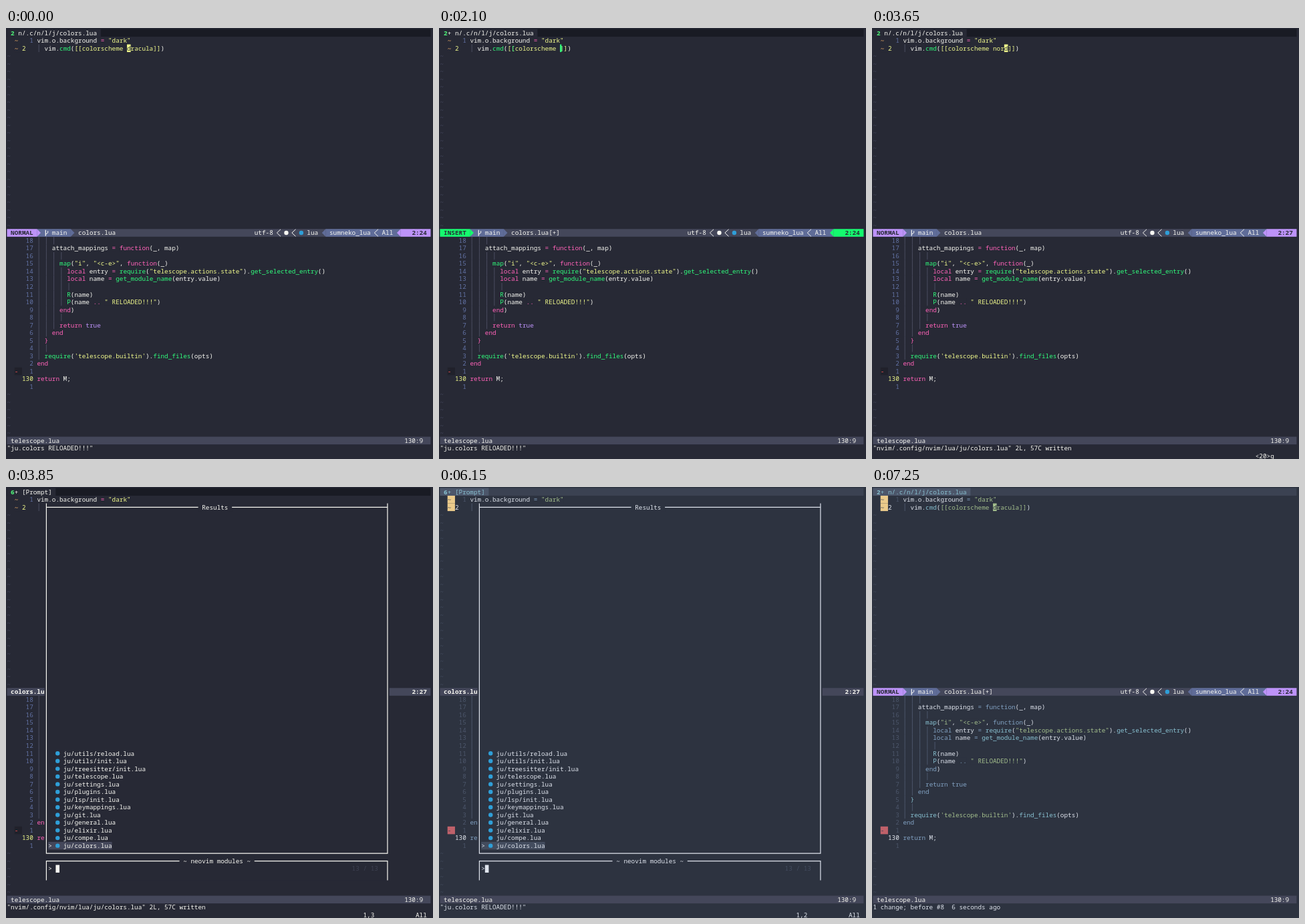
Write an HTML page with a canvas that moves like this. It is 639x646 px and loops after 8000 ms.

```html
<!DOCTYPE html>
<html lang="en">
<head>
<meta charset="utf-8">
<title>Editor session</title>
<style>
  html, body { margin: 0; width: 100%; height: 100%; overflow: hidden; background: #272935; }
  canvas { display: block; }
</style>
</head>
<body>
<canvas id="stage" width="639" height="646"></canvas>
<script>
const ctx = document.getElementById('stage').getContext('2d');
const LOOP = 8000, CW = 5.61, RH = 11.53, PAD = 1.5, COLS = 113;

const THEMES = {
  dracula: {
    bg: '#272935', fg: '#f8f8f2', key: '#ff62b8', func: '#30fa7b', str: '#f1fa8c', constant: '#bd93f9',
    brace: '#ff62b8', number: '#6272a4', current: '#f1fa8c', dim: '#44475a', guide: '#4a4d60',
    tabFill: '#191b24', tabBg: '#272935', tabFg: '#f8f8f2', tabNumber: '#50fa7b',
    change: '#ffb86c', changeBg: '#272935', remove: '#ff5555', removeBg: '#20212b', counter: '#3d4051'
  },
  nord: {
    bg: '#2d3340', fg: '#dfe4ed', key: '#81a1c1', func: '#88c0d0', str: '#a3be8c', constant: '#81a1c1',
    brace: '#88c0d0', number: '#4c566a', current: '#e5e9f0', dim: '#434c5e', guide: '#4c566a',
    tabFill: '#3b4252', tabBg: '#4c566a', tabFg: '#88c0d0', tabNumber: '#88c0d0',
    change: '#3b4252', changeBg: '#ebcb8b', remove: '#3b4252', removeBg: '#bf616a', counter: '#434c5e'
  }
};
const BAR = '#44475a', BRANCH = '#5f6c98', ICON = '#2f9fd8', POPUP = '#20212b';
const MODES = { NORMAL: '#bd93f9', INSERT: '#14fa6e' };

const RELOADED = '"ju.colors RELOADED!!!"';
const START = {
  theme: 'dracula', word: 'dracula', col: 24, mode: 'NORMAL', modified: false,
  message: RELOADED, keys: '', popup: false, picker: false, listed: false, promptCol: 3
};
const STEPS = [
  [1400, { keys: 'c' }],
  [1650, { keys: 'ci' }],
  [2000, { keys: '', mode: 'INSERT', word: '', modified: true }],
  [2200, { word: 'n', col: 25 }],
  [2350, { word: 'no', col: 26 }],
  [2400, { popup: true }],
  [2500, { word: 'nor', col: 27 }],
  [2600, { word: 'nord', col: 28 }],
  [2650, { mode: 'NORMAL', col: 27, popup: false }],
  [2900, { keys: '<20>' }],
  [3000, { keys: '', modified: false, message: '"nvim/.config/nvim/lua/ju/colors.lua" 2L, 57C written' }],
  [3200, { keys: '<20>' }],
  [3650, { keys: '<20>q' }],
  [3800, { keys: '', picker: true }],
  [3850, { listed: true }],
  [5150, { theme: 'nord', message: RELOADED }],
  [6150, { promptCol: 2 }],
  [6250, { picker: false }],
  [7250, { word: 'dracula', col: 24, modified: true, message: '1 change; before #8  6 seconds ago' }]
];

const CODE = [
  '      ',
  '    attach_mappings = function(_, map)',
  '        ',
  '      map("i", "<c-e>", function(_)',
  '        local entry = require("telescope.actions.state").get_selected_entry()',
  '        local name = get_module_name(entry.value)',
  '          ',
  '        R(name)',
  '        P(name .. " RELOADED!!!")',
  '      end)',
  '        ',
  '      return true',
  '    end',
  '  }',
  '    ',
  "  require('telescope.builtin').find_files(opts)",
  'end',
  '',
  'return M;',
  ''
];
const WORDS = ['normalize', 'normalized', 'normal', 'noremap', 'norcalli', 'nord',
  'node_start', 'node_incremental', 'node_decremental', 'no_errors'];
const MODULES = ['utils/reload', 'utils/init', 'treesitter/init', 'telescope', 'settings', 'plugins',
  'lsp/init', 'keymappings', 'git', 'general', 'elixir', 'compe', 'colors'];
const TOKENS = /(?<str>"[^"]*"|'[^']*'|\[\[.*?\]\])|(?<key>\b(?:function|local|return|end)\b|=|\.\.)|(?<constant>\btrue\b)|(?<func>\w+(?=\())|(?<brace>\})/g;

let theme;
const X = col => PAD + col * CW;
const Y = row => PAD + row * RH;

function text(col, row, string, color = theme.fg, weight = 500) {
  ctx.font = `${weight} 9.35px "Noto Sans Mono", "DejaVu Sans Mono", monospace`;
  ctx.fillStyle = color;
  ctx.fillText(string, X(col), Y(row) + 9);
}

function cells(col, row, width, color, height = 1) {
  ctx.fillStyle = color;
  ctx.fillRect(X(col), Y(row), width * CW, height * RH);
}

function dot(col, row, color) {
  ctx.fillStyle = color;
  ctx.beginPath();
  ctx.arc(X(col + .5), Y(row + .5), 3.2, 0, 7);
  ctx.fill();
}

function line(color, width, ...points) {
  ctx.strokeStyle = color;
  ctx.lineWidth = width;
  ctx.beginPath();
  points.forEach(([col, row]) => ctx.lineTo(X(col), Y(row)));
  ctx.stroke();
}

// Solid separator; dir is 1 for right-pointing, -1 for left-pointing.
function arrow(col, row, dir, color) {
  const base = dir > 0 ? col : col + 1;
  ctx.fillStyle = color;
  ctx.beginPath();
  ctx.moveTo(X(base), Y(row));
  ctx.lineTo(X(base + dir), Y(row + .5));
  ctx.lineTo(X(base), Y(row + 1));
  ctx.fill();
}

function code(row, source) {
  const indent = source.search(/\S|$/);
  for (let i = 0; i < indent; i += 2) line(theme.guide, 1, [8.5 + i, row], [8.5 + i, row + 1]);
  text(8, row, source);
  for (const match of source.matchAll(TOKENS)) {
    const kind = Object.keys(match.groups).find(name => match.groups[name]);
    cells(8 + match.index, row, match[0].length, theme.bg);
    text(8 + match.index, row, match[0], theme[kind]);
  }
}

function sign(row, mark, kind) {
  cells(2, row, 2, theme[kind + 'Bg']);
  text(2, row, mark, theme[kind]);
}

function tabLine(state) {
  const plus = state.picker ? '+' : state.modified ? '+' : '';
  const number = (state.picker ? '6' : '2') + plus;
  const name = state.picker ? '[Prompt]' : 'n/.c/n/l/j/colors.lua';
  cells(0, 0, COLS, theme.tabFill);
  cells(0, 0, number.length + name.length + 3, theme.tabBg);
  text(1, 0, number[0], theme.tabNumber, 700);
  text(2, 0, plus, theme.tabFg);
  text(2 + number.length, 0, name, theme.tabFg);
}

function buffers(state) {
  sign(1, '~', 'change');
  sign(2, '~', 'change');
  text(6, 1, '1', theme.number);
  text(4, 2, '2', theme.current);
  code(1, 'vim.o.background = "dark"');
  code(2, `  vim.cmd([[colorscheme ${state.word}]])`);
  for (let row = 3; row < 26; row++) text(0, row, '~', theme.dim);

  CODE.forEach((source, i) => {
    const row = 27 + i, current = row === 45;
    const number = current ? '130' : String(Math.abs(45 - row)).padStart(3);
    text(4, row, number, current ? theme.current : theme.number);
    code(row, source);
  });
  sign(44, '-', 'remove');
  for (let row = 47; row < 53; row++) text(0, row, '~', theme.dim);
}

function cursor(state) {
  const col = 8 + state.col;
  if (state.mode === 'NORMAL') {
    cells(col, 2, 1, theme.str);
    text(col, 2, state.word[state.col - 24], theme.bg);
    return;
  }
  const color = state.word ? theme.str : theme.func;
  if (!state.word) {
    text(19, 2, '[', color);
    text(col, 2, ']', color);
  }
  cells(col, 2, .4, color);
}

function statusLine(state) {
  const row = 26, position = '2:' + state.col;
  cells(0, row, COLS, BAR);
  if (state.picker) {
    text(1, row, 'colors.lua', '#f8f8f2', 600);
    text(108, row, position, '#f8f8f2', 600);
    return;
  }
  const accent = MODES[state.mode], ink = '#282a36', white = '#f8f8f2';
  cells(8, row, 9, BRANCH);
  cells(0, row, 8, accent);
  arrow(8, row, 1, accent);
  arrow(17, row, 1, BRANCH);
  text(1, row, state.mode, ink, 700);
  line(white, 1.2, [10.3, row + .12], [10.3, row + .9]);
  line(white, 1, [10.3, row + .7], [10.9, row + .5], [10.9, row + .25]);
  text(12, row, 'main', white);
  text(19, row, 'colors.lua' + (state.modified ? '[+]' : ''), white);

  text(66, row, 'utf-8', white);
  dot(74, row, white);
  dot(78, row, ICON);
  text(80, row, 'lua', white);
  arrow(84, row, -1, BRANCH);
  cells(85, row, 20, BRANCH);
  text(86, row, 'sumneko_lua', white);
  text(100, row, 'All', white);
  for (const col of [72, 76, 98]) line(white, 1, [col + 1, row + .04], [col, row + .5], [col + 1, row + .96]);
  arrow(104, row, -1, accent);
  cells(105, row, 8, accent);
  text(108, row, position, ink, 700);
}

function bottomLines(state) {
  cells(0, 53, COLS, BAR);
  text(1, 53, 'telescope.lua', '#f8f8f2');
  text(106, 53, '130:9', '#f8f8f2');
  text(0, 54, state.message);
  text(102, 55, state.keys);
  if (state.picker) {
    text(95, 55, '1,' + state.promptCol);
    text(109, 55, 'All');
  }
}

function popup() {
  cells(31, 3, 31, POPUP, 10);
  cells(61, 3, 1, BAR, 9);
  WORDS.forEach((word, i) => {
    text(32, 3 + i, word);
    text(49, 3 + i, 'Text [LSP]');
  });
}

function title(col, row, label) {
  cells(col - 1, row, label.length + 2, theme.bg);
  text(col, row, label);
}

function picker(state) {
  const left = 10.5, right = 101.5;
  cells(10, 2, 92, theme.bg, 49);
  line(theme.fg, 1.2, [left, 2], [left, 47.5], [right, 47.5], [right, 2]);
  line(theme.fg, 1.2, [left, 2.5], [right, 2.5]);
  line(theme.fg, 1.2, [left, 51], [left, 48.5], [right, 48.5], [right, 51]);
  title(52, 2, 'Results');
  title(47, 48, '~ neovim modules ~');
  text(11, 49, '>');
  cells(10 + state.promptCol, 49, 1, theme.fg);
  if (!state.listed) return;

  cells(11, 46, 17, theme === THEMES.nord ? '#434c5e' : BAR);
  text(11, 46, '>');
  MODULES.forEach((name, i) => {
    dot(13, 34 + i, ICON);
    text(15, 34 + i, `ju/${name}.lua`);
  });
  text(92, 49, '13 / 13', theme.counter);
}

function draw(time) {
  const passed = STEPS.filter(([at]) => at <= time).map(([, change]) => change);
  const state = Object.assign({}, START, ...passed);
  theme = THEMES[state.theme];
  ctx.fillStyle = theme.bg;
  ctx.fillRect(0, 0, 639, 646);
  tabLine(state);
  buffers(state);
  statusLine(state);
  bottomLines(state);
  if (state.picker) picker(state);
  else cursor(state);
  if (state.popup) popup();
}

function tick() {
  draw(performance.now() % LOOP);
  requestAnimationFrame(tick);
}
tick();
</script>
</body>
</html>
```
